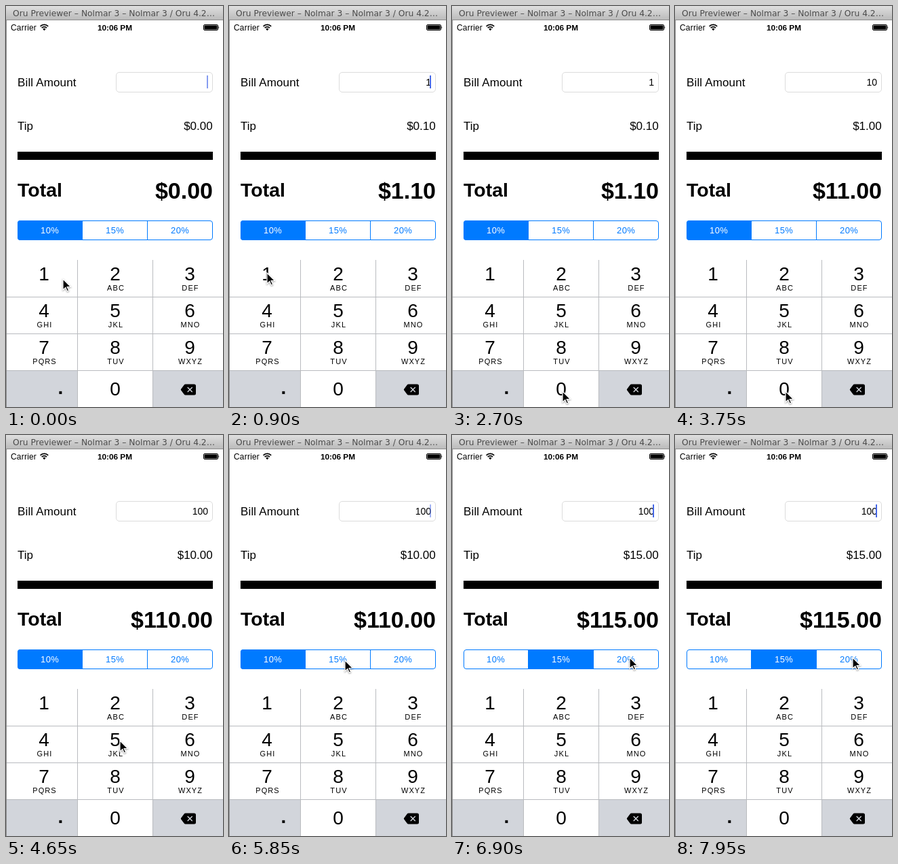
Write an HTML page that moves like this. It is 320 by 589 pixels and loops after 8 s.

```html
<!DOCTYPE html>
<html lang="en">
<head>
<meta charset="utf-8">
<title>Tip calculator</title>
<style>
html, body { margin: 0; width: 100%; height: 100%; overflow: hidden; background: #fff; }
svg { display: block; width: 320px; height: 589px; font-family: "Liberation Sans", Arial, sans-serif; }
.bold { font-weight: bold; }
.end { text-anchor: end; }
.mid { text-anchor: middle; }
.label { font-size: 17px; }
.digit { font-size: 28px; }
.letters { font-size: 11px; letter-spacing: 1.1px; }
.seg { font-size: 13px; letter-spacing: .4px; }
</style>
</head>
<body>
<svg viewBox="0 0 320 589">
  <defs>
    <linearGradient id="bar" x2="0" y2="1">
      <stop stop-color="#dfdfdf"/><stop offset="1" stop-color="#b9b9b9"/>
    </linearGradient>
    <clipPath id="pill"><rect x="17" y="315" width="288" height="29" rx="4"/></clipPath>
  </defs>
  <rect width="320" height="589" fill="#fff"/>
  <rect width="320" height="21" fill="url(#bar)"/>
  <path d="M0 20.5H320" stroke="#8e8e8e"/>
  <path d="M.5 21V589" stroke="#8a8a8a"/>
  <text x="10" y="15" font-size="12.3" fill="#4c4c4c" font-family="DejaVu Sans, sans-serif">Oru Previewer – Nolmar 3 – Nolmar 3 / Oru 4.2…</text>

  <text x="7" y="36" font-size="12" letter-spacing=".2">Carrier</text>
  <g fill="none" stroke="#000" stroke-width="1.7">
    <path d="M50.6 29.8a8.2 8.2 0 0 1 11.6 0M52.7 32.2a5.3 5.3 0 0 1 7.4 0"/>
  </g>
  <path d="M56.4 36.2l-2.2-2.4a3.2 3.2 0 0 1 4.4 0z"/>
  <text x="160.5" y="35.5" font-size="11.8" class="bold mid">10:06 PM</text>
  <rect x="291.5" y="27.5" width="21" height="8" rx="1.5" fill="none" stroke="#000"/>
  <rect x="292.5" y="28.5" width="19" height="6" rx=".5"/>
  <path d="M313.5 29.8q1.8 1.7 0 3.4z"/>

  <text x="17" y="118" class="label" letter-spacing=".15">Bill Amount</text>
  <rect x="162.5" y="97.5" width="142" height="29" rx="4.5" fill="#fff" stroke="#dcdcdc"/>
  <text id="bill" x="298" y="117" font-size="14" class="end"></text>
  <rect id="caret" x="296" y="102" width="2" height="19" fill="#4668e8"/>
  <text x="17" y="182" class="label">Tip</text>
  <text id="tip" x="304.7" y="182" class="label end"></text>
  <rect x="17" y="214" width="288" height="12"/>
  <text x="17" y="280" font-size="28.5" class="bold">Total</text>
  <text id="total" x="305" y="282.5" font-size="34" class="bold end"></text>

  <rect id="pick" y="315" width="96" height="29" fill="#007aff" clip-path="url(#pill)"/>
  <g fill="none" stroke="#007aff">
    <rect x="17.5" y="315.5" width="287" height="28" rx="3.5"/>
    <path d="M112.5 316V343M208.5 316V343"/>
  </g>
  <g id="segs"></g>

  <path d="M1 536H105V589H1zM217 536H320V589H217z" fill="#d2d5db"/>
  <path d="M1 427.5H320M1 481.5H320M1 535.5H320M105.5 373V589M216.5 373V589" stroke="#b9bbbf" fill="none"/>
  <g id="keys"></g>
  <text x="80.3" y="570" class="digit bold mid">.</text>
  <path d="M264.5 555.5H277.5q2.5 0 2.5 2.5V569q0 2.5-2.5 2.5H264.5q-1 0-1.8-.9l-4.5-6q-.8-1.1 0-2.2l4.5-6q.8-.9 1.8-.9z"/>
  <path d="M267.7 560l7 7M274.7 560l-7 7" stroke="#d2d5db" stroke-width="1.4"/>

  <path id="cursor" d="M0 0V16L3.8 12.4L6.3 18L8.7 17L6.2 11.5H11.5Z" stroke="#fff" stroke-width="1.2"
    style="filter:drop-shadow(0 1px 1px #0006)"/>
</svg>
<script>
const el = id => document.getElementById(id);
const LOOP = 8000, STEP = 150, SWITCH = 6150;

// time, x, y of the pointer tip
const path = [
  [0, 84, 401], [150, 78, 399], [600, 56, 392], [1200, 56, 392], [1350, 70, 400],
  [1500, 115, 440], [1650, 155, 473], [1800, 166, 515], [1950, 167, 552],
  [2100, 166, 569], [2250, 164, 567], [2700, 163, 566], [4200, 163, 566],
  [4350, 163, 560], [4500, 165, 510], [4650, 168, 449], [4800, 171, 395],
  [4950, 172, 355], [5250, 171, 331], [6300, 171, 331], [6450, 185, 332],
  [6600, 225, 331], [6750, 255, 328], [6900, 262, 327]
];
// time of each key press and the bill after it
const typed = [[-500, ""], [900, "1"], [3150, "10"], [3890, "100"]];

const text = (x, y, cls, s) => `<text x="${x}" y="${y}" class="${cls} mid">${s}</text>`;

const letters = ["", "ABC", "DEF", "GHI", "JKL", "MNO", "PQRS", "TUV", "WXYZ"];
const columns = [56, 161, 271];
el("keys").innerHTML = letters.map((s, i) => {
  const x = columns[i % 3], y = 403 + 54 * Math.floor(i / 3);
  return text(x, y, "digit", i + 1) + text(x + 1, y + 15, "letters", s);
}).join("") + text(161, 572, "digit", 0);

el("segs").innerHTML = [10, 15, 20].map((p, i) => text(64.7 + 96 * i, 334, "seg", p + "%")).join("");
const segs = [...el("segs").children];

function pointer(t) {
  const i = path.findIndex(p => p[0] > t);
  if (i < 0) return path.at(-1).slice(1);
  const [t0, x0, y0] = path[i - 1], [t1, x1, y1] = path[i];
  const k = (t - t0) / (t1 - t0);
  return [x0 + (x1 - x0) * k, y0 + (y1 - y0) * k];
}

// the caret blinks once a second, restarting at each key press
function blink(p) {
  if (p < 450) return 1;
  if (p < 600) return .65;
  return p > 955 ? .5 : 0;
}

function draw(t) {
  const [since, bill] = typed.findLast(k => k[0] <= t);
  const choice = t < SWITCH ? 0 : 1;
  const tip = bill * (choice ? .15 : .1);
  el("bill").textContent = bill;
  el("tip").textContent = "$" + tip.toFixed(2);
  el("total").textContent = "$" + (+bill + tip).toFixed(2);
  el("caret").setAttribute("opacity", blink((t - since) % 1000));
  el("pick").setAttribute("x", 17 + 96 * choice - choice);
  el("pick").setAttribute("width", 96 + choice);
  segs.forEach((s, i) => s.setAttribute("fill", i === choice ? "#fff" : "#007aff"));
  el("cursor").setAttribute("transform", `translate(${pointer(t)})`);
}

let start;
function tick(now) {
  start ??= now;
  draw(Math.floor((now - start) % LOOP / STEP) * STEP);
  requestAnimationFrame(tick);
}
draw(0);
requestAnimationFrame(tick);
</script>
</body>
</html>
```
